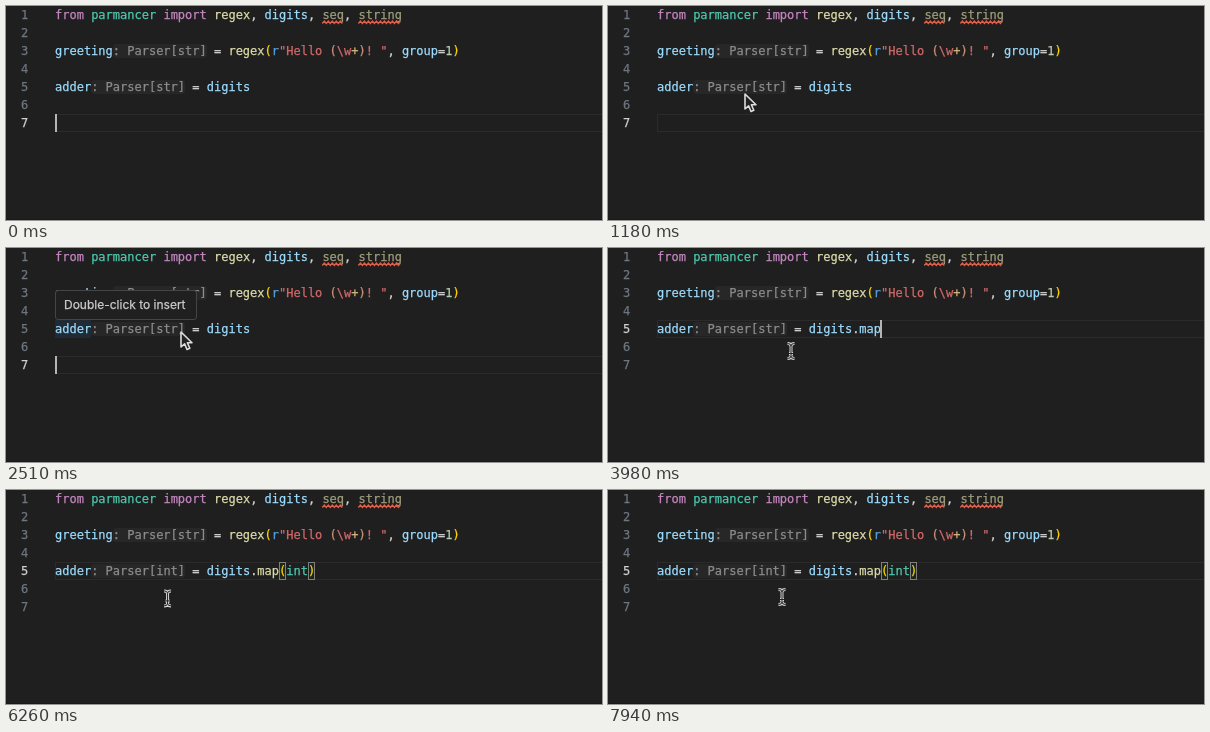
These frames come from a looping animation (596 px wide and 214 px high, 8000 ms). An HTML page:

```html
<!DOCTYPE html>
<html lang="en">
<head>
<meta charset="utf-8">
<style>
  html, body { margin: 0; width: 100%; height: 100%; overflow: hidden; background: #1f1f1f; }
  #stage { position: relative; width: 596px; height: 214px; overflow: hidden;
    font: 12px/18px "DejaVu Sans Mono", monospace; color: #d4d4d4; -webkit-text-stroke: .25px; }
  #stage > * { position: absolute; }
  pre { margin: 0; top: 0; font: inherit; }
  #numbers { left: 15px; color: #6e7681; }
  #numbers .active { color: #d0d0d0; }
  #code { left: 49px; }
  #current { left: 49px; width: 560px; height: 18px; box-sizing: border-box; border: 1px solid #2b2b2b; }
  #caret { width: 2px; height: 18px; background: #b4b4b4; }
  #tip { left: 49px; top: 42px; width: 142px; height: 30px; box-sizing: border-box;
    border: 1px solid #454545; border-radius: 3px; background: #202020; color: #ccc;
    padding-left: 8px; font: 12px/27px Inter, sans-serif; white-space: nowrap; }
  #bottom { left: 0; top: 213px; width: 596px; height: 1px; background: #21131f; }
  svg { left: 0; top: 0; }
  .key { color: #c586c0; }
  .type { color: #4ec9b0; }
  .var { color: #9cdcfe; }
  .fn { color: #dcdcaa; }
  .unused { opacity: .67; }
  .raw { color: #569cd6; }
  .re { color: #d16969; }
  .group { color: #ce9178; }
  .plus { color: #d7ba7d; }
  .num { color: #b5cea8; }
  .paren { color: #ffd700; }
  .hint { color: #8c8c8c; background: #272727; border-radius: 3px; }
  .match, #adder { display: inline-block; height: 18px; vertical-align: top; }
  .match { outline: 1px solid #808080; outline-offset: -1px; background: #1d261d; }
  #adder.hovered { background: #212b36; }
</style>
</head>
<body>
<div id="stage">
  <div id="current"></div>
  <pre id="numbers"></pre>
  <pre id="code"><span class="key">from</span> <span class="type">parmancer</span> <span class="key">import</span> <span class="fn">regex</span>, <span class="var">digits</span>, <span class="fn unused">seq</span>, <span class="fn unused">string</span>

<span class="var">greeting</span><span class="hint">: Parser[str]</span> = <span class="fn">regex</span><span class="paren">(</span><span class="raw">r</span><span class="re">"Hello <span class="group">(</span>\w<span class="plus">+</span><span class="group">)</span>! "</span>, <span class="var">group</span>=<span class="num">1</span><span class="paren">)</span>

<span class="var" id="adder">adder</span><span class="hint">: Parser[<span id="kind">str</span>]</span> = <span class="var">digits</span><span id="typed"></span></pre>
  <div id="caret"></div>
  <div id="tip">Double-click to insert</div>
  <div id="bottom"></div>
  <svg width="596" height="214" fill="none">
    <path id="squiggles" stroke="#d9604c" stroke-width="1.4"/>
    <g id="mouse" stroke-linejoin="round">
      <path id="arrow" d="M0 0V15L3.6 11.8 6 17.5 8.8 16.3 6.4 10.8H11Z" fill="#222" stroke="#ddd" stroke-width="1.6"/>
      <g id="beam">
        <path d="M-3.5-7.5Q0-7.5 0-5Q0-7.5 3.5-7.5M0-5V5M-3.5 7.5Q0 7.5 0 5Q0 7.5 3.5 7.5M-2 2.5H2" stroke="#d4d4d4" stroke-width="3"/>
        <path d="M-3.5-7.5Q0-7.5 0-5Q0-7.5 3.5-7.5M0-5V5M-3.5 7.5Q0 7.5 0 5Q0 7.5 3.5 7.5M-2 2.5H2" stroke="#222"/>
      </g>
    </g>
  </svg>
</div>
<script>
const LOOP = 8000, BLINK = 490, LEFT = 49, CHAR = 7.224, ROW = 18;
const $ = id => document.getElementById(id);
const show = (id, on) => { $(id).style.display = on ? '' : 'none'; };
const setHTML = (el, html) => { if (el.shown !== html) el.innerHTML = el.shown = html; };
const span = (type, text) => `<span class="${type}">${text}</span>`;

// Each edit restarts the caret's blinking
const map = '.' + span('fn', 'map');
const open = span('paren match', '('), close = span('paren match', ')');
const edits = [
  { at: -330, row: 7, column: 0, text: '' },
  { at: 2510, row: 7, column: 0, text: '' },
  { at: 3980, row: 5, column: 31, text: '.' + span('var', 'map') },
  { at: 4230, row: 5, column: 31, text: map },
  { at: 4390, row: 5, column: 32, text: map + open + close },
  { at: 4460, row: 5, column: 35, text: map + open + span('type', 'int') + close }
];

const entry = [198, 230];
const moves = [
  { from: 360, to: 1180, x: 137, y: 88 },
  { from: 1250, to: 2500, x: 175, y: 84 },
  { from: 2900, to: 3240, x: 183, y: 103 },
  { from: 5250, to: 5670, x: 166, y: 111 },
  { from: 6230, to: 6640, x: 135.5, y: 93 },
  { from: 6810, to: 7370, x: 180, y: 91 },
  { from: 7740, to: 7930, x: 174, y: 107 }
];

function mouseAt(t) {
  let [x, y] = entry;
  for (const m of moves) {
    const k = Math.min(1, Math.max(0, (t - m.from) / (m.to - m.from)));
    const eased = 1 - (1 - k) ** 2;
    x += (m.x - x) * eased;
    y += (m.y - y) * eased;
  }
  return [x, y];
}

function squiggle(column, length) {
  const x = LEFT + column * CHAR, end = x + length * CHAR;
  let d = `M${x} 17.5`;
  for (let i = 1; x + i * 2 <= end; i++) d += `L${x + i * 2} ${i % 2 ? 15 : 17.5}`;
  return d;
}
$('squiggles').setAttribute('d', squiggle(37, 3) + squiggle(42, 6));

function draw(now) {
  const t = now % LOOP;
  const edit = edits.filter(e => e.at <= t).pop();

  setHTML($('numbers'), [1, 2, 3, 4, 5, 6, 7]
    .map(n => n === edit.row ? span('active', n) : n).join('\n'));
  setHTML($('typed'), edit.text);
  setHTML($('kind'), t < 5440 ? 'str' : 'int');

  $('current').style.top = $('caret').style.top = (edit.row - 1) * ROW + 'px';
  $('caret').style.left = Math.floor(LEFT + edit.column * CHAR) + 'px';
  show('caret', Math.floor((t - edit.at) / BLINK) % 2 === 0);

  const hovering = t >= 1740 && t < 3090;
  show('tip', hovering);
  $('adder').classList.toggle('hovered', hovering);

  const [x, y] = mouseAt(t), overHint = y < 90;
  $('mouse').setAttribute('transform', `translate(${x} ${y})`);
  show('arrow', overHint);
  show('beam', !overHint);

  requestAnimationFrame(draw);
}
draw(performance.now());
</script>
</body>
</html>
```
